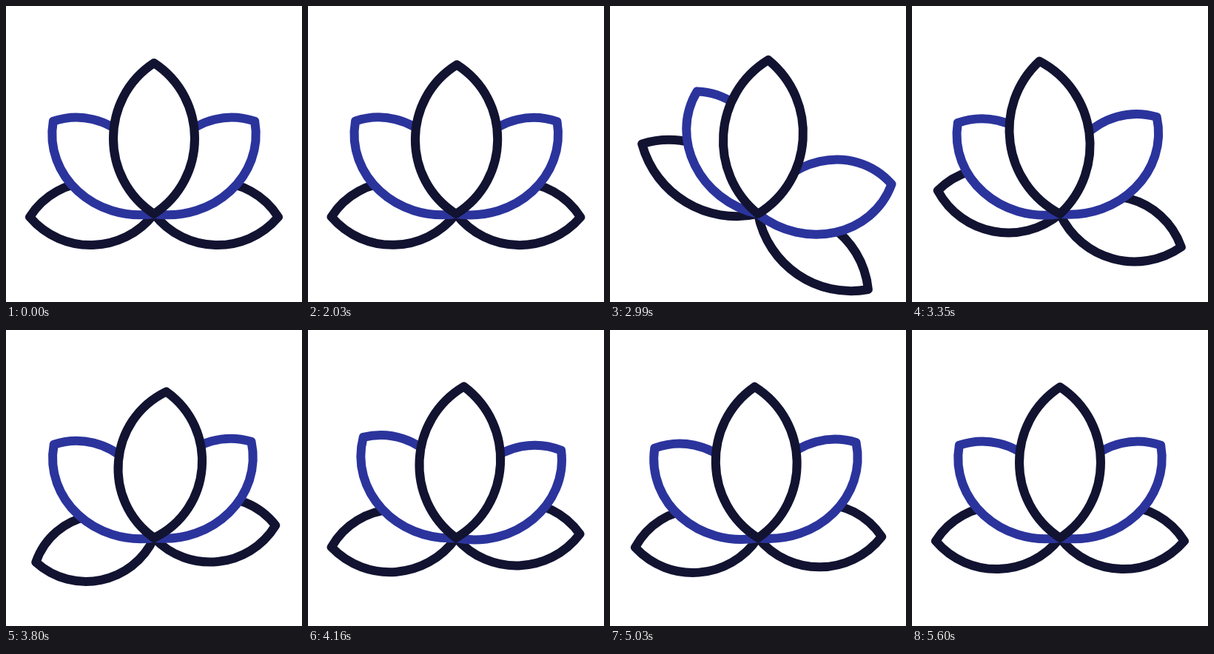
Write an HTML page that moves like this. It is 400 px wide and 400 px high and loops after 5630 ms.

```html
<!DOCTYPE html>
<html lang="en">
<head>
<meta charset="utf-8">
<title>Lotus</title>
<style>
html, body { margin: 0; width: 100%; height: 100%; overflow: hidden; background: #fff; }
svg { display: block; width: 100vw; height: 100vh; }
path { fill: #fff; stroke-width: 12; stroke-linejoin: round; }
</style>
</head>
<body>
<svg id="stage" viewBox="0 0 400 400"></svg>
<script>
const LOOP = 5630, REST = 2000, START = 2030, STEP = 30;

// The breeze reaches the layers one after another: first peak, gap to the next, end of motion.
const outer = { color: '#121331', length: 168, lean: 0, first: 2930, gap: 860, end: 5610 };
const middle = { color: '#2b349c', length: 185, lean: 0.03, first: 2740, gap: 760, end: 5430 };
const center = { color: '#121331', length: 204, lean: 0, first: 2470, gap: 820, end: 5430 };

// peaks: turning points of the swing in degrees; stretch and drag: length change with swing and speed.
const petals = [
  { ...outer, angle: -91.4, left: 40, right: 45, peaks: [33, -10.2, 3, -3], stretch: 0.003, drag: 0.45 },
  { ...outer, angle: 91.4, left: 45, right: 40, peaks: [33.5, -7.3, 0, -2], stretch: 0.0024, drag: 0.3 },
  { ...middle, angle: -47.4, left: 47, right: 51, peaks: [29, -4, 5, -3.5], stretch: 0, drag: 0 },
  { ...middle, angle: 47.4, left: 51, right: 47, peaks: [42, -7, 3, -3.5], stretch: 0, drag: 0 },
  { ...center, angle: 0, left: 55, right: 55, peaks: [32, -8, 6.5, -3.4], stretch: -0.0034, drag: -0.5 }
];

const stage = document.getElementById('stage');
for (const p of petals) {
  p.el = document.createElementNS('http://www.w3.org/2000/svg', 'path');
  p.el.setAttribute('stroke', p.color);
  stage.append(p.el);
}

// Cosine swing from peak to peak, each gap shorter than the one before.
function swing(p, t) {
  if (t <= REST || t >= p.end) return 0;
  let from = REST, to = p.first, a = 0, gap = p.gap, i = 0;
  while (t > to) {
    a = p.peaks[i++];
    from = to;
    to = i < p.peaks.length ? to + gap : p.end;
    gap *= 0.8;
  }
  const b = p.peaks[i] ?? 0;
  return a + (b - a) * (1 - Math.cos(Math.PI * (t - from) / (to - from))) / 2;
}

// One edge of a petal, close to a circular arc; lean moves its belly towards the tip.
function edge(length, sag, lean) {
  const reach = (1 - (2 * sag / length) ** 2) / 3;
  const x = sag * 4 / 3;
  return [[x, -(reach + lean) * length], [x, -(1 - reach + lean) * length]];
}

function drawPetal(p, t) {
  const turn = swing(p, t);
  const speed = (swing(p, t + 5) - swing(p, t - 5)) / 10;
  const length = p.length * (1 + p.stretch * turn + p.drag * speed);
  const widen = p.length / length;
  const [l1, l2] = edge(length, -p.left * widen, p.lean);
  const [r1, r2] = edge(length, p.right * widen, p.lean);
  p.el.setAttribute('d', `M0 0C${l1} ${l2} 0 ${-length}C${r2} ${r1} 0 0Z`);
  p.el.setAttribute('transform', `translate(200 281) rotate(${p.angle + turn})`);
}

function frame(now) {
  const t = now % LOOP;
  const shown = t < START ? 0 : START + Math.floor((t - START) / STEP) * STEP;
  for (const p of petals) drawPetal(p, shown);
  requestAnimationFrame(frame);
}

frame(0);
</script>
</body>
</html>
```
